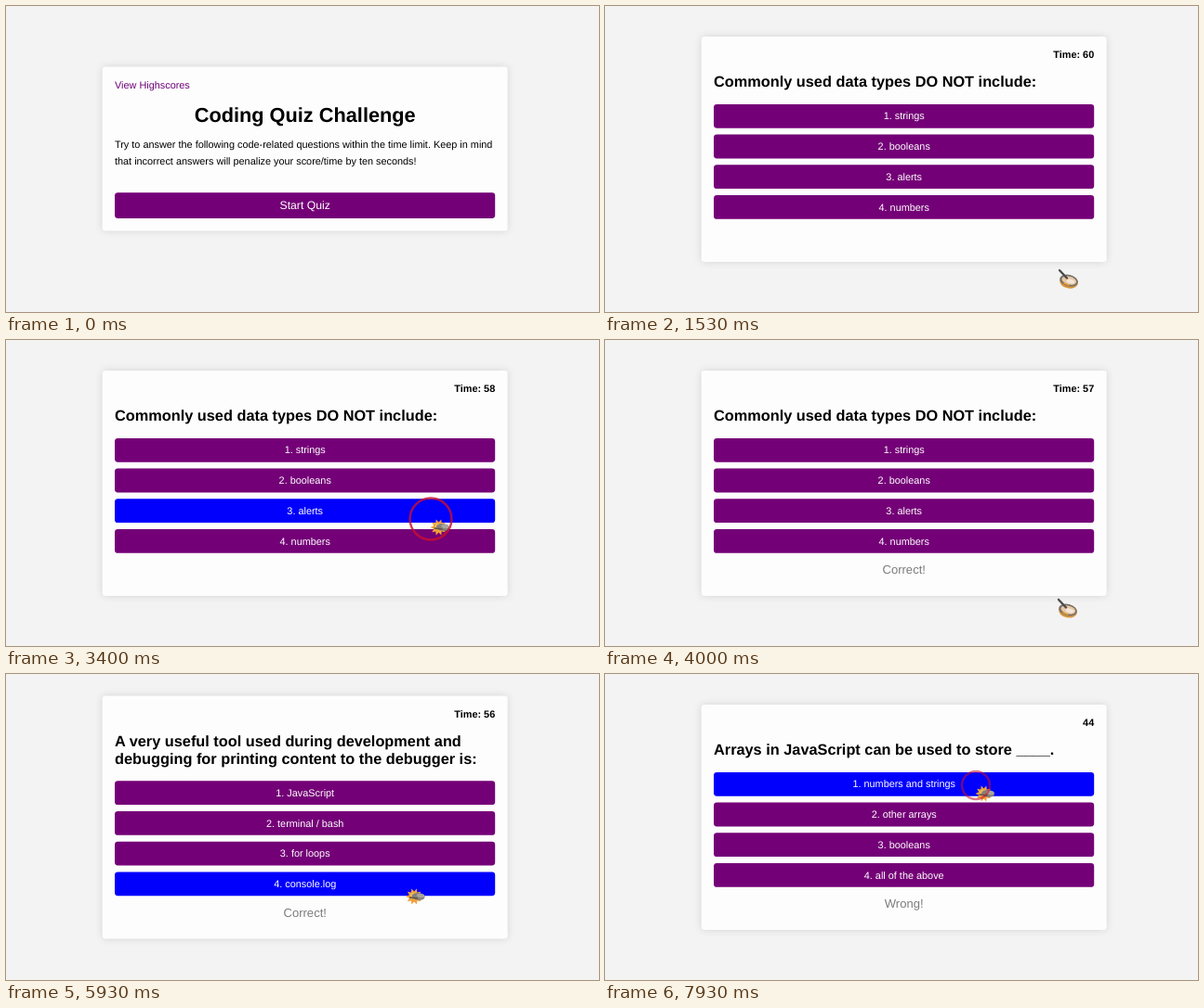
These frames come from a looping animation (638x330 px, 8 s). An HTML page with a canvas:

```html
<!DOCTYPE html>
<html lang="en">
<head>
<meta charset="utf-8">
<title>Coding Quiz Challenge</title>
<style>
  html, body { margin: 0; width: 100%; height: 100%; overflow: hidden; background: #f3f3f3; }
  canvas { display: block; }
</style>
</head>
<body>
<canvas id="stage" width="638" height="330"></canvas>
<script>
const ctx = document.getElementById('stage').getContext('2d');
const LOOP = 8000;
const LEFT = 117, RIGHT = 526.2, CENTER = 321.7;
const PURPLE = '#740077', BLUE = '#0000fc';

const TIMER_START = 950;
const WRONG_AT = 7860;

const questions = [
  { from: 930, answered: 3450, feedback: 'Correct!',
    title: ['Commonly used data types DO NOT include:'],
    answers: ['strings', 'booleans', 'alerts', 'numbers'] },
  { from: 4465, answered: 5455, feedback: 'Correct!',
    title: ['A very useful tool used during development and',
            'debugging for printing content to the debugger is:'],
    answers: ['JavaScript', 'terminal / bash', 'for loops', 'console.log'] },
  { from: 6455, answered: WRONG_AT, feedback: 'Wrong!',
    title: ['Arrays in JavaScript can be used to store ____.'],
    answers: ['numbers and strings', 'other arrays', 'booleans', 'all of the above'] }
];

// Pointer stops: time, x, y
const path = [
  [40, 518, 334], [640, 482, 222], [1000, 480, 217], [1480, 487, 283],
  [1850, 487, 283], [2500, 462, 218], [3300, 457, 193], [3480, 457, 193],
  [3950, 486, 278], [4380, 486, 277], [5080, 434, 234], [5330, 431, 231],
  [6780, 430, 231], [7200, 426, 219], [7650, 399, 120], [8000, 399, 120]
];
const presses = [830, 3380, 5390, 7785];

function pointerAt(t) {
  if (t <= path[0][0]) return { x: path[0][1], y: path[0][2] };
  const i = path.findIndex(stop => stop[0] >= t);
  const [t0, x0, y0] = path[i - 1], [t1, x1, y1] = path[i];
  const k = (t - t0) / (t1 - t0), ease = k * k * (3 - 2 * k);
  return { x: x0 + (x1 - x0) * ease, y: y0 + (y1 - y0) * ease };
}

function text(str, x, y, size, { color = '#000', align = 'left', weight = 'normal' } = {}) {
  ctx.font = `${weight} ${size}px "Liberation Sans", Arial, sans-serif`;
  ctx.textRendering = 'geometricPrecision';
  ctx.textAlign = align;
  ctx.fillStyle = color;
  ctx.fillText(str, x, y);
}

function roundRect(x, y, w, h, color) {
  ctx.beginPath();
  ctx.roundRect(x, y, w, h, 3.4);
  ctx.fillStyle = color;
  ctx.fill();
}

function card(top, bottom) {
  ctx.save();
  ctx.shadowColor = 'rgba(0,0,0,.13)';
  ctx.shadowBlur = 8;
  roundRect(103.7, top, 436, bottom - top, '#fdfdfd');
  ctx.restore();
}

// Draws a button and tells whether the pointer is over it.
function button(label, top, height, size, pointer) {
  const hover = pointer.x > LEFT && pointer.x < RIGHT &&
                pointer.y > top && pointer.y < top + height;
  roundRect(LEFT, top, RIGHT - LEFT, height, hover ? BLUE : PURPLE);
  text(label, CENTER, top + height / 2 + size * .34, size, { color: '#fff', align: 'center' });
  return hover;
}

function startScreen(pointer) {
  card(65.6, 242.6);
  text('View Highscores', LEFT, 88.7, 10.88, { color: '#6c0078' });
  text('Coding Quiz Challenge', CENTER, 125, 21.76, { align: 'center', weight: 'bold' });
  text('Try to answer the following code-related questions within the time limit. Keep in mind',
    LEFT, 153.3, 10.88);
  text('that incorrect answers will penalize your score/time by ten seconds!', LEFT, 171, 10.88);
  return button('Start Quiz', 201.2, 27.8, 12.24, pointer);
}

function questionScreen(q, t, pointer) {
  const shift = (q.title.length - 1) * 9.4;
  const bold = { weight: 'bold' };
  const elapsed = Math.floor(Math.max(0, t - TIMER_START) / 1000);
  const time = t < WRONG_AT ? `Time: ${60 - elapsed}` : `${50 - elapsed}`;

  card(33 - shift, 276 + shift);
  text(time, RIGHT, 56 - shift, 10.88, { ...bold, align: 'right' });
  q.title.forEach((line, i) => text(line, LEFT, 87.4 - shift + i * 18.9, 16.32, bold));

  let hover = false;
  q.answers.forEach((answer, i) => {
    const over = button(`${i + 1}. ${answer}`, 105.9 + shift + i * 32.7, 25.8, 10.88, pointer);
    hover = hover || over;
  });
  if (t >= q.answered)
    text(q.feedback, CENTER, 252.3 + shift, 13.06, { color: '#7c7c7c', align: 'center' });
  return hover;
}

function ellipse(x, y, rx, ry, angle, color) {
  ctx.beginPath();
  ctx.ellipse(x, y, rx, ry, angle, 0, Math.PI * 2);
  ctx.fillStyle = color;
  ctx.fill();
}

function line(x0, y0, x1, y1, width, color) {
  ctx.beginPath();
  ctx.moveTo(x0, y0);
  ctx.lineTo(x1, y1);
  ctx.lineWidth = width;
  ctx.strokeStyle = color;
  ctx.lineCap = 'round';
  ctx.stroke();
}

function panCursor() {
  ellipse(12, 14.5, 10, 7, .2, '#d9963f');
  ellipse(12, 13, 10, 6.2, .25, '#77706a');
  ellipse(12.3, 13, 8, 4.4, .25, '#e9c7a4');
  ellipse(14, 14, 4.5, 2.3, .25, '#f2e6da');
  line(7, 16, 12, 18, 1.6, '#e8a238');
  line(2, 2, 10, 10.5, 2.4, '#4c4b4b');
}

function burstCursor() {
  ctx.beginPath();
  for (let i = 0; i < 20; i++) {
    const r = i % 2 ? 5.5 : 9, a = i * Math.PI / 10;
    ctx.lineTo(8.5 + r * Math.cos(a), 9 + r * Math.sin(a));
  }
  ctx.closePath();
  ctx.fillStyle = '#f0a13a';
  ctx.fill();
  ellipse(8, 8, 3.6, 3.2, 0, '#f6bd55');
  ellipse(13, 9, 7, 3.9, .12, '#85807a');
  ellipse(15.5, 8, 4.2, 2.2, .15, '#aaa59d');
  line(4, 10, 12, 11, 1.4, '#5f5348');
}

function drawPointer(pointer, active) {
  ctx.save();
  ctx.translate(pointer.x, pointer.y);
  (active ? burstCursor : panCursor)();
  ctx.restore();
}

function drawPress(t, pointer) {
  for (const start of presses) {
    const age = t - start;
    if (age < 0 || age > 300) continue;
    ctx.beginPath();
    ctx.arc(pointer.x, pointer.y, 23.7 - age * .06, 0, Math.PI * 2);
    ctx.lineWidth = 2.4;
    ctx.strokeStyle = `rgba(205,15,45,${.85 - age * .002})`;
    ctx.stroke();
  }
}

function draw(now) {
  const t = now % LOOP;
  const pointer = pointerAt(t);
  ctx.fillStyle = '#f3f3f3';
  ctx.fillRect(0, 0, 638, 330);

  const q = questions.filter(item => t >= item.from).pop();
  const hover = q ? questionScreen(q, t, pointer) : startScreen(pointer);
  // The active cursor lingers while the pointer rests between questions.
  drawPointer(pointer, hover || t > 5000);
  drawPress(t, pointer);
}

const began = performance.now();
function tick() {
  draw(performance.now() - began);
  requestAnimationFrame(tick);
}
tick();
</script>
</body>
</html>
```
